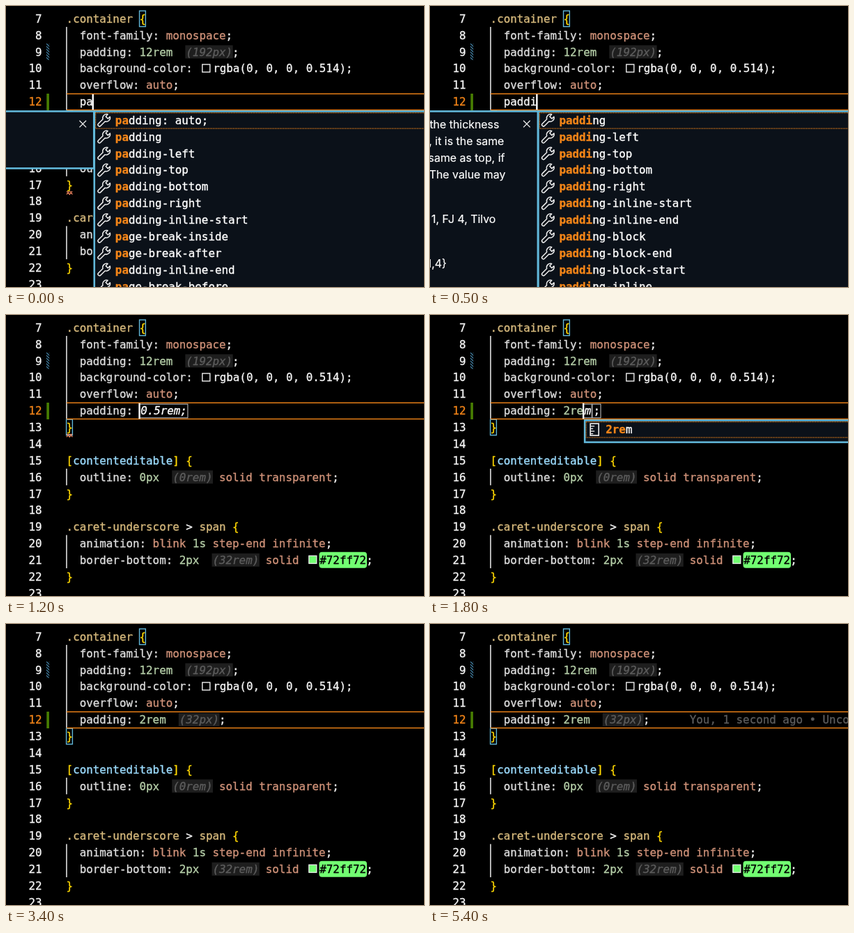
These frames come from a looping animation (600 by 404 pixels, 5.5 s). An HTML page:

```html
<!DOCTYPE html>
<html lang="en">
<head>
<meta charset="utf-8">
<title>CSS editor</title>
<style>
html, body { margin: 0; width: 100%; height: 100%; overflow: hidden; background: #000; }
svg { display: block; font-family: "DejaVu Sans Mono", monospace; font-size: 15.85px; }
text { white-space: pre; stroke-width: .35; }
text.doc { font-family: Inter, sans-serif; font-size: 15.9px; stroke-width: .2; }
</style>
</head>
<body>
<svg id="stage" width="600" height="404" viewBox="0 0 600 404">
  <defs>
    <pattern id="hatch" width="4" height="4" patternUnits="userSpaceOnUse">
      <path d="M-1 1 L1 -1 M0 4 L4 0 M3 5 L5 3" transform="matrix(-1 0 0 1 4 0)" stroke="#4a90b8" stroke-width="1.2"/>
    </pattern>
  </defs>
  <g id="base"></g>
  <g id="live"></g>
</svg>
<script>
const LOOP = 5500, CH = 9.54, LINE = 23.86, LEFT = 86.6;
const C = {
  text: '#f4f4f4', prop: '#dcdcdc', sel: '#d7ba7d', brace: '#ffd700', str: '#ce9178',
  num: '#b5cea8', attr: '#9cdcfe', hint: '#5c5c5c', orange: '#f38518', blue: '#62b8da', panel: '#0b1119'
};
const base = document.getElementById('base'), live = document.getElementById('live');
let into = base;

function add(tag, attrs, str) {
  const el = document.createElementNS('http://www.w3.org/2000/svg', tag);
  for (const k in attrs) el.setAttribute(k, attrs[k]);
  if (str) el.textContent = str;
  into.appendChild(el);
}
const mid = n => 18.2 + (n - 7) * LINE;
const col = n => LEFT + n * CH;
const rect = (x, y, w, h, fill, more) => add('rect', { x, y, width: w, height: h, fill, ...more });
const put = (x, y, str, fill, more) => add('text', { x, y: y + 5.7, fill, stroke: fill, ...more }, str);
const outline = (x, y, w, h, stroke, sw = 1.2) =>
  rect(x, y, w, h, 'none', { stroke, 'stroke-width': sw });

// Writes [text, colour] pieces one after another from a column.
function code(n, start, ...parts) {
  for (const [str, fill] of parts) {
    put(col(start), mid(n), str, fill);
    start += str.length;
  }
}
function hint(n, start, str) {
  rect(col(start) - 1, mid(n) - 9.5, str.length * CH + 1.5, 19, '#1e1e1e');
  put(col(start), mid(n), str, C.hint, { 'font-style': 'italic' });
}
const guide = (a, b) => rect(86.2, mid(a) - 12, 1.5, (b - a + 1) * LINE, '#eee');
const match = (n, c) => outline(col(c), mid(n) - 11.2, 8.8, 22.6, C.blue, 1.4);

function drawBase() {
  for (let n = 7; n <= 23; n++)
    put(51.6, mid(n), String(n), n === 12 ? C.orange : C.text, { 'text-anchor': 'end' });
  rect(58, 54, 4.2, 23.5, 'url(#hatch)');
  rect(58.3, 126, 3.6, 24, '#487e02');
  guide(8, 12); guide(16, 16); guide(20, 21);
  match(7, 11); match(13, 0);

  code(7, 0, ['.container ', C.sel], ['{', C.brace]);
  code(8, 2, ['font-family: ', C.prop], ['monospace', C.str], [';', C.text]);
  code(9, 2, ['padding: ', C.prop], ['12rem', C.num]);
  hint(9, 18, '(192px)');
  code(9, 25, [';', C.text]);
  code(10, 2, ['background-color:', C.prop]);
  outline(281.8, 84, 11, 11, '#eee', 1.4);
  put(297.2, mid(10), 'rgba(0, 0, 0, 0.514);', C.text);
  code(11, 2, ['overflow: ', C.prop], ['auto', C.str], [';', C.text]);
  code(13, 0, ['}', C.brace]);
  code(15, 0, ['[', C.brace], ['contenteditable', C.attr], ['] {', C.brace]);
  code(16, 2, ['outline: ', C.prop], ['0px', C.num]);
  hint(16, 16, '(0rem)');
  code(16, 23, ['solid transparent', C.str], [';', C.text]);
  code(17, 0, ['}', C.brace]);
  code(19, 0, ['.caret-underscore', C.sel], [' > ', C.text], ['span ', C.sel], ['{', C.brace]);
  code(20, 2, ['animation: ', C.prop], ['blink ', C.str], ['1s ', C.num],
    ['step-end infinite', C.str], [';', C.text]);
  code(21, 2, ['border-bottom: ', C.prop], ['2px', C.num]);
  hint(21, 22, '(32rem)');
  code(21, 30, ['solid', C.str]);
  rect(434.8, 346.2, 11, 11, '#72ff72', { stroke: '#eee', 'stroke-width': 1.3 });
  rect(449.5, mid(21) - 11.5, 68.5, 23, '#72ff72', { rx: 4 });
  put(450.3, mid(21), '#72ff72', '#000');
  put(517.3, mid(21), ';', C.text);
  code(22, 0, ['}', C.brace]);

  rect(87, 125.6, 520, 1.4, C.orange);
  rect(87, 148.8, 520, 1.4, C.orange);
}

const FIRST = ['padding: auto;', 'padding', 'padding-left', 'padding-top', 'padding-bottom',
  'padding-right', 'padding-inline-start', 'page-break-inside', 'page-break-after',
  'padding-inline-end', 'page-break-before'];
const LATER = ['', '-left', '-top', '-bottom', '-right', '-inline-start', '-inline-end',
  '-block', '-block-end', '-block-start', '-inline'].map(s => 'padding' + s);
// [line end relative to the list, y, text]
const DOCS = [
  [-54.5, 170, 'values for the thickness'],
  [-47.5, 194, 'is omitted, it is the same'],
  [-46.5, 218, 'it is the same as top, if'],
  [-45.5, 242, 'as top. The value may'],
  [-59.5, 306, 'e 1, FJ 4, Tilvo'],
  [-130, 370, ']{1,4}']
];

function wrench(x, y) {
  add('path', {
    d: 'M14.5 4.2L12.2 6.4L9.8 4L12 1.6A4.3 4.3 0 0 0 6.6 7L1.6 12A1.7 1.7 0 0 0 4 14.4L9 9.4A4.3 4.3 0 0 0 14.5 4.2Z',
    transform: `translate(${x + 5.2} ${y - 10.5}) scale(1.3)`,
    fill: 'none', stroke: '#eee', 'stroke-width': 1.15, 'stroke-linejoin': 'round'
  });
}
function ruler(x, y) {
  outline(x + 9.5, y - 8, 12, 17, '#eee', 1.6);
  for (let i = 0; i < 4; i++) rect(x + 9.5, y - 5 + i * 3.6, i % 2 ? 4 : 6, 1.3, '#eee');
}

function popup(x, items, hit, icon) {
  const h = items.length > 1 ? 270 : 31.5;
  rect(x + 1.5, 151.4, 620 - x, h, C.panel, { stroke: C.blue, 'stroke-width': 2.6 });
  rect(x + 3.4, 153.6, 620 - x, 22.6, 'none',
    { stroke: C.orange, 'stroke-width': 1.2, 'stroke-dasharray': '1.2 1.2' });
  items.forEach((s, i) => {
    const y = 164.2 + i * LINE;
    icon(x, y);
    put(x + 31.6, y, s.slice(0, hit), C.orange, { 'font-weight': 'bold', 'stroke-width': 0 });
    put(x + 31.6 + hit * CH, y, s.slice(hit), '#fff');
  });
}

function docs(x, full) {
  rect(-5, 151.4, x + 6, full ? 270 : 82, C.panel, { stroke: C.blue, 'stroke-width': 2.6 });
  const cx = x - 15, cy = 169.6;
  add('path', { d: `M${cx - 4.8} ${cy - 4.8}l9.6 9.6m0 -9.6l-9.6 9.6`, stroke: '#eee', 'stroke-width': 1.3 });
  if (full) for (const [dx, y, s] of DOCS)
    put(x + dx, y, s, '#fff', { class: 'doc', 'text-anchor': 'end' });
}

function squiggle(n) {
  const y = mid(n) + 9.6;
  rect(86.8, y, 8.6, 1.3, '#e8805c');
  add('path', { d: `M87 ${y + 4.5}l2.1 -2.6l2.1 2.6l2.1 -2.6l2.1 2.6`, fill: 'none', stroke: '#e8805c', 'stroke-width': 1.3 });
}

const caret = x => rect(x - 1.2, 126.8, 2.4, 22.4, '#fff');
function boxed(x, str, style) {
  const w = str.length * CH + 2.6;
  outline(x, 128.2, w, 19.6, '#bbb', 1.1);
  put(x + 1.6, mid(12), str, '#fff', { 'font-style': style });
  return x + w;
}

// [start, typed, suggested rest]
const STEPS = [
  [0, 'pa'], [200, 'pad'], [300, 'padd'], [400, 'paddi'], [600, 'paddin'], [700, 'padding'],
  [1000, 'padding: '], [1200, 'padding: ', '0.5rem'], [1400, 'padding: 2', 'rem'],
  [1600, 'padding: 2r', 'em'], [1700, 'padding: 2re', 'm'], [1900, 'padding: 2rem']
];
const DONE = 2500, BLAME = 4000;

function drawTyping([, typed, rest]) {
  const end = col(2 + typed.length);
  const value = typed.slice(9);
  code(12, 2, [typed.slice(0, 9), typed.length > 8 ? C.prop : C.text], [value, C.num]);
  if (typed.length < 9) {
    if (typed === 'pa') squiggle(17);
    docs(end + 0.5, typed !== 'pa');
    popup(end + 0.5, typed === 'pa' ? FIRST : LATER, typed.length, wrench);
  } else {
    if (!value) squiggle(13);
    if (!rest) put(end, mid(12), ';', C.text);
    else if (!value) boxed(end, rest + ';', 'italic');
    else boxed(boxed(end, rest, 'italic') + 0.6, ';', 'normal');
    if (value.length > 1) popup(end + 0.5, ['2rem'], value.length, ruler);
  }
  caret(end);
}

function drawDone(blink, blame) {
  code(12, 2, ['padding: ', C.prop], ['2rem', C.num]);
  hint(12, 17, '(32px)');
  code(12, 23, [';', C.text]);
  if (blame) code(12, 30, ['You, 1 second ago • Uncommitted changes', '#5c5c5c']);
  if (blink) caret(col(24) + 1);
}

let last = '';
function render(t) {
  const done = t >= DONE, blame = t >= BLAME;
  const blink = Math.floor((t - DONE) / 500) % 2 === 0;
  const step = STEPS.filter(s => s[0] <= t).pop();
  const key = done ? `${blink}${blame}` : String(step[0]);
  if (key === last) return;
  last = key;
  into = live;
  live.textContent = '';
  if (done) drawDone(blink, blame); else drawTyping(step);
}

drawBase();
const begin = performance.now();
function tick() {
  render((performance.now() - begin) % LOOP);
  requestAnimationFrame(tick);
}
tick();
</script>
</body>
</html>
```
